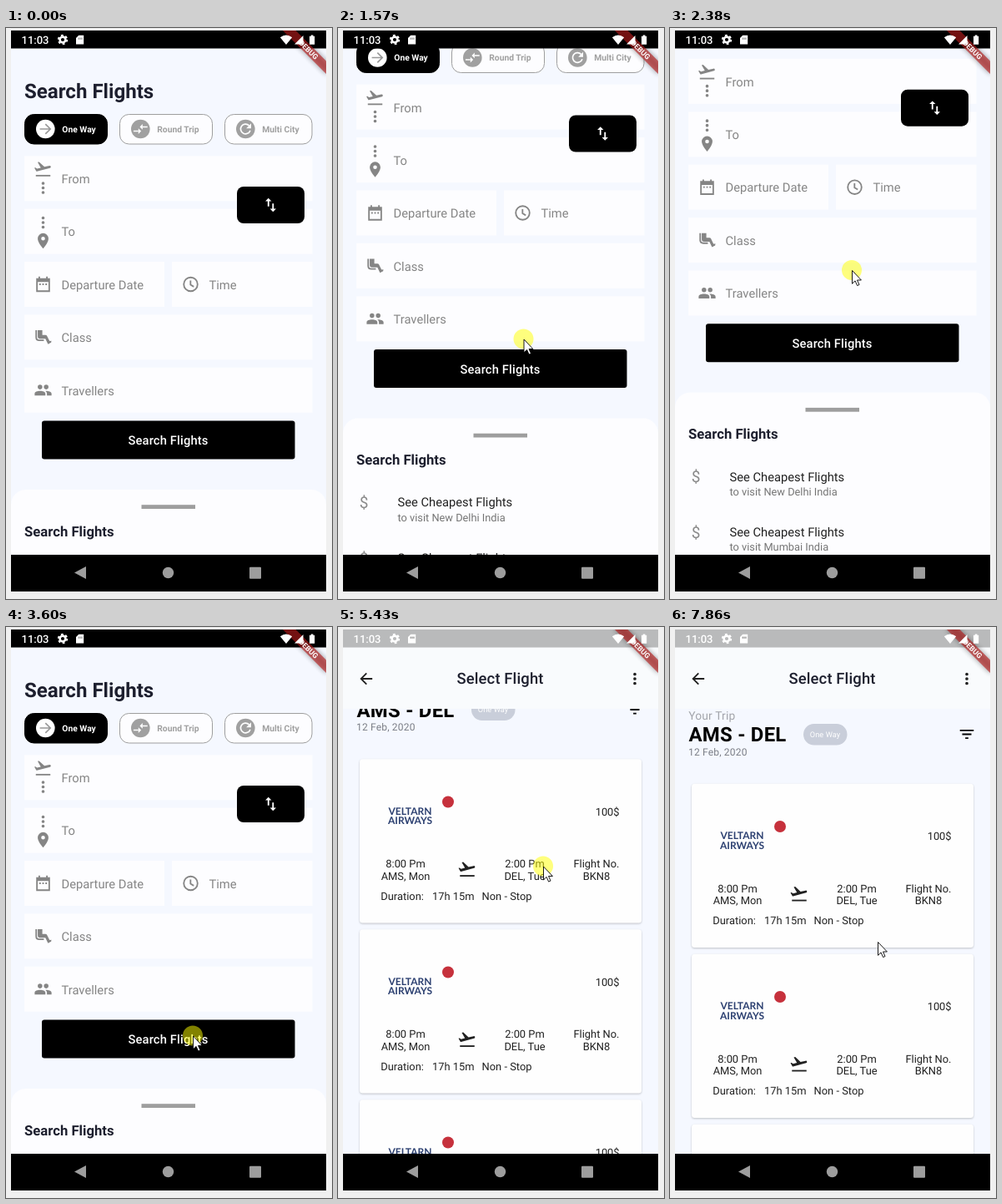
An HTML page for the animation above (8 s loop, 391x684 px).

```html
<!DOCTYPE html>
<html lang="en">
<head>
<meta charset="utf-8">
<title>Flight search</title>
<style>
html, body { margin: 0; width: 100%; height: 100%; overflow: hidden; background: #f0f0f0; }
svg { display: block; width: 391px; height: 684px; }
text { font-family: Roboto, "Open Sans", sans-serif; text-rendering: geometricPrecision; white-space: pre; }
.logo { font-family: Lato, "Open Sans", sans-serif; }
.card { filter: drop-shadow(0 1px 1px rgba(0, 0, 0, .22)); }
</style>
</head>
<body>
<svg id="stage" viewBox="0 0 391 684" xmlns="http://www.w3.org/2000/svg"></svg>
<script>
const GREY = "#858585", INK = "#1d1f2e", DARK = "#212121", BG = "#f5f8ff", PAPER = "#fdfdff";

// Drawing helpers
const rect = (x, y, w, h, fill, r = 0, more = "") =>
  `<rect x="${x}" y="${y}" width="${w}" height="${h}" rx="${r}" fill="${fill}" ${more}/>`;
const disc = (x, y, r, fill) => `<circle cx="${x}" cy="${y}" r="${r}" fill="${fill}"/>`;
const text = (x, y, size, fill, str, weight = 400, more = "") =>
  `<text x="${x}" y="${y}" font-size="${size}" fill="${fill}" font-weight="${weight}" ${more}>${str}</text>`;
const mid = (x, y, size, fill, str, weight = 400, more = "") =>
  text(x, y, size, fill, str, weight, `text-anchor="middle" ${more}`);
const space = n => `letter-spacing="${n}"`;
const ring = (x, y, r) => `M${x - r} ${y}a${r} ${r} 0 1 0 ${2 * r} 0a${r} ${r} 0 1 0 ${-2 * r} 0Z`;

// Icons on a 24 unit grid: stroked lines, filled shapes
const ICONS = {
  takeoff: ["M2.5 20H21.5", "M.6 9.9L2.1 9.5L4 11L9 9.7L4.9 2.6L6.8 2.1L13.7 8.5L20.2 7.1A1.5 1.5 0 0 1 21 10L4 14.5H3.2Z"],
  more: ["", [6, 12, 18].map(y => ring(12, y, 2)).join("")],
  pin: ["", "M12 22Q5 14 5 9A7 7 0 0 1 19 9Q19 14 12 22Z" + ring(12, 9, 2.5)],
  date: ["M4 5H20V21H4ZM7 2V5M17 2V5", "M4 5H20V9H4Z" + [7, 11, 15].map(x => `M${x} 11h2v2h-2z`).join("")],
  clock: [ring(12, 12, 9) + "M11.8 7V12.6L16 15.1", ""],
  seat: ["M3 3V12Q3 16 7 16H13", "M5 3H11V9H15Q16.5 9 17 10.1L20.4 17L22.8 16.6L22.5 19L18.4 21L15 14H8Q5 14 5 11Z"],
  group: ["", ring(8, 8, 3) + ring(16, 8, 3) +
    "M1 19V16.5C1 12 15 12 15 16.5V19ZM15 13C18 12.7 23 14 23 16.5V19H17V16.5Q17 14.5 15 13Z"],
  swap: ["M9 14V6M15 10V18", "M9 3L5 7H13ZM15 21L11 17H19Z"],
  trade: ["M2 15H9M22 9H15", "M13 15L9 11V19ZM11 9L15 5V13Z"],
  refresh: ["M18.7 14A7 7 0 1 1 17 7", "M20 4V11H13Z"],
  back: ["M20 12H5M12.5 4.8L5.3 12L12.5 19.2", ""],
  arrow: ["M4 12H19M12 5L19 12L12 19", ""],
  filter: ["M3 7H21M6 12H18M10 17H14", ""]
};
const icon = (name, x, y, color = GREY, k = .92) =>
  `<g transform="translate(${x - 12 * k} ${y - 12 * k}) scale(${k})">` +
  `<path fill="none" stroke="${color}" stroke-width="2" d="${ICONS[name][0]}"/>` +
  `<path fill="${color}" fill-rule="evenodd" d="${ICONS[name][1]}"/></g>`;

function searchPage() {
  const chip = (x, w, fill, edge, name, tint, label, ink) =>
    rect(x + .5, 103.5, w - 1, 35.5, fill, 11, `stroke="${edge}"`) +
    disc(x + 25.3, 121, 11.3, tint) + icon(name, x + 25.3, 121, fill === "#000" ? "#999" : "#fff", .84) +
    text(x + 45.3, 124.6, 10.3, ink, label, 700);
  const field = (row, x, w, label, name) => {
    const y = 153.2 + 63.4 * row;
    return rect(x, y, w, 54, PAPER) + text(x + 44.5, y + 32.8, 14.72, GREY, label) +
      (name ? icon(name, x + 22.5, y + 27) : "");
  };
  const offer = (i, city) => {
    const y = 654.3 + 66.2 * i;
    return mid(31, y + 6.5, 19, "#8a8a8a", "$") +
      text(71.5, y + 4.6, 14.72, DARK, "See Cheapest Flights") +
      text(71.5, y + 22.3, 12.8, "#757575", `to visit ${city} India`);
  };
  return [
    text(22, 84, 24.1, INK, "Search Flights", 700),
    chip(22, 100, "#000", "#000", "arrow", "#fff", "One Way", "#fff"),
    chip(136, 112, PAPER, "#9e9e9e", "trade", "#a0a0a0", "Round Trip", "#a0a0a0"),
    chip(262, 105.5, PAPER, "#9e9e9e", "refresh", "#a0a0a0", "Multi City", "#a0a0a0"),
    field(0, 22, 345.5, "From"), field(1, 22, 345.5, "To"),
    field(2, 22, 168, "Departure Date", "date"), field(2, 199, 168.5, "Time", "clock"),
    field(3, 22, 345.5, "Class", "seat"), field(4, 22, 345.5, "Travellers", "group"),
    icon("takeoff", 44.5, 169.5), icon("more", 44.5, 191.5), icon("more", 44.5, 233), icon("pin", 44.5, 255),
    rect(277, 190, 81, 44, "#000", 8), icon("swap", 317.5, 212, "#fff"),
    rect(43, 470.5, 303.5, 46, "#000", 3),
    mid(194.5, 499, 14.72, "#fff", "Search Flights", 500, space(.15)),
    rect(6, 553, 378, 400, PAPER, 18),
    rect(162.5, 571.2, 64.5, 4.8, "#9e9e9e"),
    text(22, 608.6, 16.7, INK, "Search Flights", 700),
    offer(0, "New Delhi"), offer(1, "Mumbai")
  ].join("");
}

function flightCard(i) {
  const pair = (x, a, b) => mid(x, 317.6, 12.88, DARK, a) + mid(x, 332.3, 12.88, DARK, b);
  const brand = (y, str) => mid(86.5, y, 12, "#2b3f70", str, 700, 'class="logo"');
  return `<g transform="translate(0 ${i * 204})">` + [
    rect(26, 187.8, 338, 196.2, "#fefefe", 3.5, 'class="card"'),
    disc(132, 239, 7, "#c6313c"), brand(254, "VELTARN"), brand(265.8, "AIRWAYS"),
    text(337.6, 255, 12.88, DARK, "100$", 400, 'text-anchor="end"'),
    pair(81, "8:00 Pm", "AMS, Mon"), icon("takeoff", 155, 320.2, DARK),
    pair(224, "2:00 Pm", "DEL, Tue"), pair(310, "Flight No.", "BKN8"),
    text(51.3, 356, 12.88, DARK, "Duration:"),
    text(113, 356, 12.88, DARK, "17h 15m"),
    text(172.6, 356, 12.88, DARK, "Non - Stop")
  ].join("") + "</g>";
}

function resultsPage() {
  return [
    text(22.3, 111.3, 13.8, "#a3a5ab", "Your Trip", 400, space(.15)),
    text(22.5, 137, 23.9, "#000", "AMS - DEL", 700, space(.25)),
    text(22, 153.8, 12, "#7b7e86", "12 Feb, 2020", 400, space(.18)),
    rect(160, 116, 52.5, 25.5, "#c9ceda", 12.7),
    mid(186, 131.6, 9.2, "#fff", "One Way", 400, space(.1)),
    icon("filter", 356, 128.5, "#000"),
    ...[0, 1, 2, 3, 4].map(flightCard)
  ].join("");
}

const statusIcons = text(18.5, 19, 13, "#fff", "11:03", 500) +
  '<g fill="none" stroke="#fff"><circle cx="68" cy="14" r="3.4" stroke-width="2.6"/>' +
  '<circle cx="68" cy="14" r="5.2" stroke-width="2" stroke-dasharray="2.7 2.745"/></g>' +
  '<path fill="#fff" d="M87.3 8.8H93.2V19.6H84V12Z"/>' +
  '<path stroke="#777" d="M87.2 11.6v2.2m1.9-2.2v2.2m1.9-2.2v2.2"/>' +
  '<path fill="#fff" d="M336 20L328.8 11.2Q336 6 343.2 11.2ZM346 19.5L356.5 9V19.5ZM364 9.7h1.8V8.5h2.6V9.7h1.8V19.7h-6.2z"/>';

const banner = '<g transform="translate(384 3) rotate(45)">' +
  rect(-37, 25.8, 74, 11, "#000", 0, 'opacity=".38" filter="url(#soft)"') +
  rect(-37, 25.8, 74, 11, "rgba(183,28,28,.627)") +
  mid(1.5, 34.4, 8.8, "#fff", "DEBUG", 700) + "</g>";

document.getElementById("stage").innerHTML = `
<defs>
  <clipPath id="phone"><rect x="6" y="3" width="378" height="672"/></clipPath>
  <clipPath id="body"><rect x="6" y="24" width="378" height="607"/></clipPath>
  <clipPath id="list"><rect x="6" y="98" width="378" height="533"/></clipPath>
  <filter id="soft" x="-30%" y="-150%" width="160%" height="400%"><feGaussianBlur stdDeviation="3.4"/></filter>
</defs>
${rect(0, 0, 391, 684, "#f0f0f0")}
<g clip-path="url(#phone)">
  ${rect(6, 3, 378, 672, BG)}
  <g clip-path="url(#body)"><g id="search">${searchPage()}</g></g>
  ${rect(6, 3, 378, 21.5, "#000")}
  <g id="results">
    ${rect(6, 24, 378, 607, BG)}
    <g clip-path="url(#list)"><g id="flights">${resultsPage()}</g></g>
    ${rect(6, 24, 378, 74, "#f9fbfd")}
    ${icon("back", 33.8, 62, DARK)}${icon("more", 356, 62, DARK)}
    ${mid(194.5, 68.3, 18.4, INK, "Select Flight", 500, space(.14))}
  </g>
  <g id="bar">${rect(6, 3, 378, 21.5, "#b9babb")}</g>
  ${banner}${statusIcons}
  ${rect(6, 631, 378, 44, "#000")}
  <path fill="#9d9d9d" d="M82 652.5L96 645V660Z"/>
  ${disc(194.5, 652.5, 6.7, "#9d9d9d")}${rect(292, 645.7, 14, 14, "#9d9d9d", 1)}
</g>
<g id="pointer">
  <circle id="press" r="12" fill="#ff0" opacity=".51"/>
  <path d="M.5 .5V16.3L4.1 12.9L6.6 18.6L9 17.5L6.5 12H11.4Z" fill="#fff" stroke="#000" stroke-width=".9"/>
</g>`;

// The screen refreshes in even steps; pointer stops are [step, x, y]
const FIRST = 350, STEP = 202.7;
const STOPS = [[0, 215, 521], [1, 225, 499], [2, 225, 499], [4, 226, 465], [8, 219, 280], [10, 218, 290],
  [13, 224, 489.5], [18, 224, 489.5], [22, 248, 336], [25, 246, 286.5], [27, 232, 92],
  [29, 216, 498], [31, 214, 594], [33, 224, 448], [37, 249, 377]];
const PRESSES = [[3, 9], [10, 14], [16, 17], [22, 31]];

const clamp = (v, lo, hi) => Math.min(hi, Math.max(lo, v));

function pointerAt(n) {
  const i = clamp(STOPS.findIndex(s => s[0] > n), 1, STOPS.length - 1);
  const [a, b] = n >= 37 ? STOPS.slice(-2) : [STOPS[i - 1], STOPS[i]];
  const p = clamp((n - a[0]) / (b[0] - a[0]), 0, 1), e = p * p * (3 - 2 * p);
  return [a[1] + (b[1] - a[1]) * e, a[2] + (b[2] - a[2]) * e];
}

// The list follows the finger: one drag up, then one drag down
function listScroll(n, y) {
  if (n <= 27) return Math.max(0, 316 - y);
  return n < 31 ? clamp(593.4 - y, 0, 224) : 0;
}

const [search, results, flights, bar, pointer, press] =
  ["search", "results", "flights", "bar", "pointer", "press"].map(id => document.getElementById(id));
const move = (node, x, y) => node.setAttribute("transform", `translate(${x} ${y})`);
const show = (node, on) => node.setAttribute("visibility", on ? "visible" : "hidden");

function draw(time) {
  const n = Math.floor((time % 8000 - FIRST) / STEP);
  const [x, y] = pointerAt(n);
  const fade = clamp((n - 17) / 2, 0, 1);
  move(search, 0, -clamp(458 - y, 0, 116.3));
  move(flights, 0, -listScroll(n, y));
  move(results, 0, (1 - fade) * 60);
  results.setAttribute("opacity", fade);
  bar.setAttribute("opacity", fade);
  move(pointer, x, y);
  show(pointer, n >= 0);
  show(press, PRESSES.some(([a, b]) => n >= a && n < b));
}

function loop() {
  draw(performance.now());
  requestAnimationFrame(loop);
}
loop();
</script>
</body>
</html>
```
